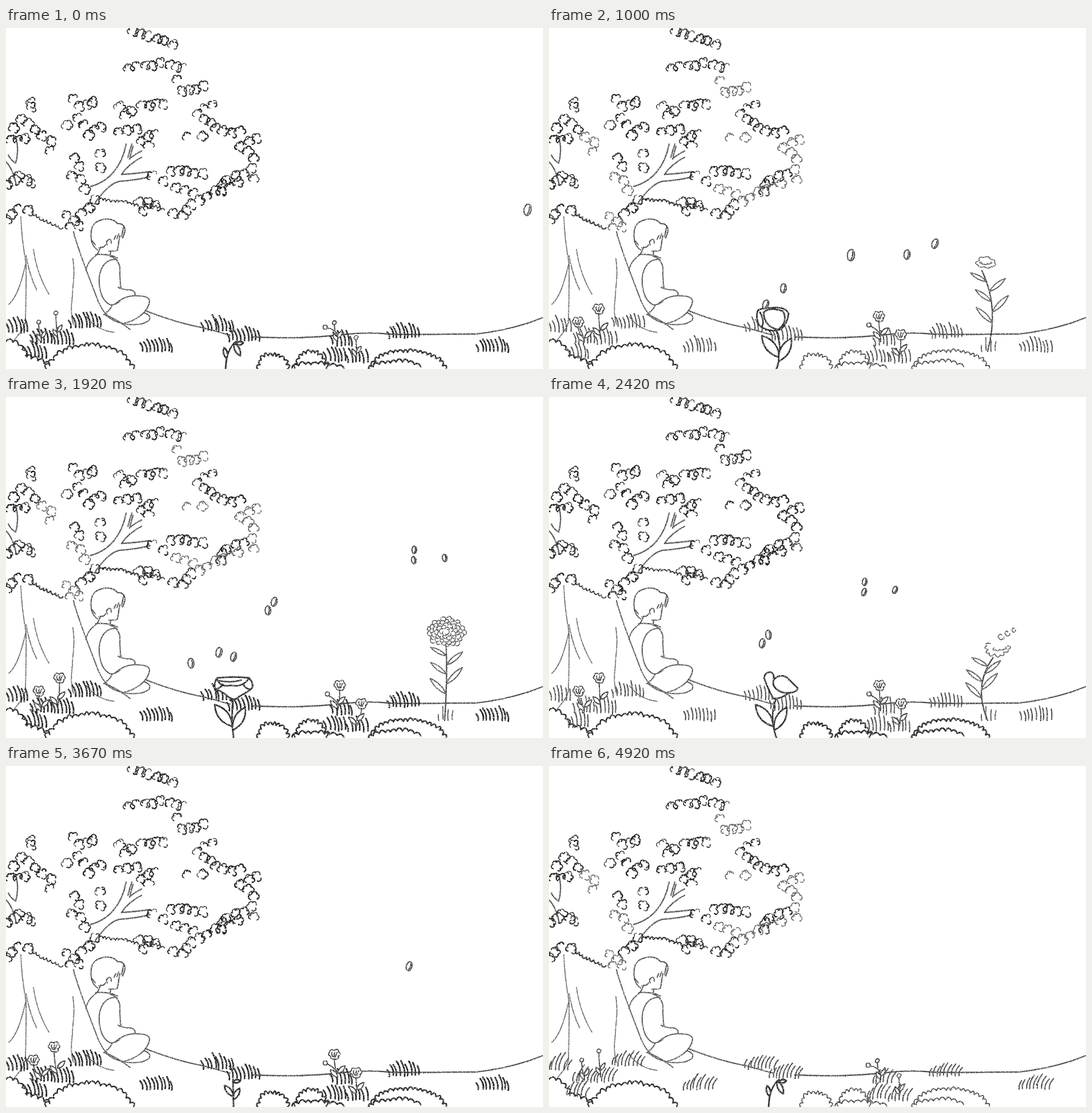
These frames come from a looping animation (939x596 px, 5000 ms). An HTML page with a canvas:

```html
<!DOCTYPE html>
<html lang="en">
<head>
<meta charset="utf-8">
<title>Under the tree</title>
<style>
  html, body { margin: 0; width: 939px; height: 596px; overflow: hidden; background: #fff; }
  canvas { display: block; filter: url(#pencil); }
  svg { position: absolute; width: 0; height: 0; }
</style>
</head>
<body>
<svg><filter id="pencil" x="0" y="0" width="100%" height="100%" color-interpolation-filters="sRGB">
  <feTurbulence type="fractalNoise" baseFrequency=".65" numOctaves="2" seed="4" result="noise"/>
  <feColorMatrix in="noise" values="0 0 0 0 0  0 0 0 0 0  0 0 0 0 0  4 0 0 0 -.9" result="grain"/>
  <feDisplacementMap in="SourceGraphic" in2="noise" scale="2" xChannelSelector="R" yChannelSelector="G" result="rough"/>
  <feComposite in="rough" in2="grain" operator="in"/>
</filter></svg>
<canvas id="stage" width="939" height="596"></canvas>
<script>
const ctx = document.getElementById('stage').getContext('2d');
const FPS = 12, LOOP = 5000;
const { sin, cos, exp, PI, min, max, hypot, floor, round, sqrt } = Math;
const TAU = 2 * PI;

function seeded(s) {
  return () => {
    s = (s + 0x6d2b79f5) | 0;
    let t = Math.imul(s ^ (s >>> 15), 1 | s);
    t = (t + Math.imul(t ^ (t >>> 7), 61 | t)) ^ t;
    return ((t ^ (t >>> 14)) >>> 0) / 4294967296;
  };
}

const points = s => s.split(' ').map(p => p.split(',').map(Number));
const mix = (a, b, u) => a + (b - a) * u;
const bend = (a, b, c, u) => mix(mix(a, b, u), mix(b, c, u), u);

// Smooth rise from 0 to 1 between two steps.
function ramp(k, from, to) {
  const u = max(0, min(1, (k - from) / (to - from)));
  return u * u * (3 - 2 * u);
}

function ink(color, width) {
  ctx.strokeStyle = color;
  ctx.lineWidth = width;
}

function line(d, color, width) {
  ink(color, width);
  ctx.stroke(new Path2D(d));
}

function curve(x0, y0, cx, cy, x1, y1) {
  ctx.beginPath();
  ctx.moveTo(x0, y0);
  ctx.quadraticCurveTo(cx, cy, x1, y1);
  ctx.stroke();
}

// ---- tree, sitter and ground ----
const TRUNK = 'M26 330C27 365 32 395 35 412C36 450 34 500 34 514C31 526 22 536 14 546' +
  'M35 410C28 440 20 470 5 483M35 398Q42 435 54 458M48 387Q54 430 75 465' +
  'M117 403C121 430 117 445 116 470C113 490 114 505 118 518M141 505Q158 528 189 532';
const BRANCHES = 'M148 277C182 268 203 240 210 203M154 308C168 288 182 272 198 268Q228 266 252 260' +
  'M237 226Q214 238 202 256Q230 254 252 251M220 203L213 226M237 215Q224 221 216 229L222 207' +
  'M4 190C9 186 16 188 18 194Q23 215 17 236Q9 232 4 222M0 234Q13 247 18 275';
const BACK = 'M118 356C126 388 143 430 156 464C163 484 170 498 180 504Q200 513 217 527';
const HEAD = 'M160 388Q149 379 149 368C147 350 152 340 165 336C178 331 190 335 195 342' +
  'C206 341 210 350 207 359Q205 364 204 367M206 346L202 365M197 360L194 368M192 363L189 369' +
  'M178 371Q184 366 184 376M178 371Q174 375 177 379M163 384Q172 384 174 379M151 372L156 379' +
  'M199 363Q197 376 195 388Q191 391 180 390M183 390L182 399M165 383Q163 391 159 396';
const BODY = 'M157 396Q180 394 195 402M158 397C147 405 141 415 140 424M195 405C178 402 165 415 163 437' +
  'C162 462 170 479 183 484Q192 484 199 478M182 399Q196 403 199 418Q199 440 201 455' +
  'M196 453Q204 458 219 458Q228 461 225 468M171 501Q181 495 186 484' +
  'M190 483Q207 467 228 468Q251 468 251 478Q249 492 235 503Q220 514 205 516Q190 515 173 501' +
  'M203 517Q238 522 250 511Q255 502 242 498';
const GROUND = 'M246 495C280 508 312 518 345 524Q368 530 392 537M430 540C500 543 540 541 590 536' +
  'Q628 531 672 535C730 537 770 534 820 535Q885 528 939 506';

function scenery() {
  line(GROUND, '#444', 2.3);
  line(TRUNK, '#666', 1.8);
  line(BRANCHES, '#555', 2.4);
  line(BACK, '#555', 2);
  line(HEAD, '#444', 2);
  line(BODY, '#555', 2.1);
}

// ---- foliage: puffs strung along a few sprays ----
const SPRAYS = ['222,5 291,29', '216,72 270,60 312,74', '302,92 306,112 344,104', '362,134 336,152 380,182 410,184',
  '320,190 342,192', '441,192 410,206 432,230 432,262', '416,258 384,264 378,288', '404,272 340,298 298,282',
  '290,248 344,253', '258,260 276,267', '294,322 310,332 326,308', '234,304 262,312 238,322'];
const INNER_SPRAYS = ['46,134 44,136', '14,174 26,160 50,178', '10,194 34,196', '62,190 80,196 76,218',
  '118,124 130,138 152,130', '108,172 124,158 144,186 166,176', '200,136 208,152 236,136 276,132', '194,184 226,176',
  '238,196 262,190 250,208', '122,226 126,242', '166,222 164,243', '112,260 132,262 136,284', '2,276 24,256 46,271',
  '0,336 18,320 38,322', '108,330 128,346 112,350', '134,326 156,302'];

// Visits evenly spaced spots on a polyline, passing position and unit direction.
function walk(pts, step, visit) {
  for (let i = 1; i < pts.length; i++) {
    const [ax, ay] = pts[i - 1], [bx, by] = pts[i];
    const len = hypot(bx - ax, by - ay), n = max(1, round(len / step));
    for (let j = 1; j <= n; j++)
      visit(mix(ax, bx, j / n), mix(ay, by, j / n), (bx - ax) / len, (by - ay) / len, len / n);
  }
}

function puff(x, y, rnd, faint) {
  for (let i = 0; i < 5; i++) {
    const a = PI * .9 + i * PI * .33 + rnd() * .5, r = 3.2 + rnd() * 1.4, d = 4 + rnd() * 3;
    const sweep = PI * (.35 + rnd() * .2), bold = rnd();
    if (i > 2 && bold < .4) continue;
    ink(faint ? '#555' : '#181818', faint ? 1.7 : 1.3 + bold * 1.3);
    ctx.beginPath();
    ctx.arc(x + cos(a) * d, y + sin(a) * d, r, a - sweep, a + sweep);
    ctx.stroke();
  }
}

function scallop(pts, step, seed, color, width) {
  const rnd = seeded(seed);
  let [px, py] = pts[0];
  ink(color, width);
  ctx.beginPath();
  ctx.moveTo(px, py);
  walk(pts, step, (x, y, ux, uy, gap) => {
    const h = step * (.7 + rnd() * .5);
    const ex = x + (rnd() - .5) * 3, ey = y + (rnd() - .5) * 3;
    ctx.quadraticCurveTo((px + x) / 2 + uy * h, (py + y) / 2 - ux * h, ex, ey);
    [px, py] = [ex, ey];
  });
  ctx.stroke();
}

function foliage(k) {
  const alt = floor(k / 3) % 3 === 1, rnd = seeded(11);
  for (const spray of [...SPRAYS, ...INNER_SPRAYS]) {
    const moved = rnd() < .35 && alt, pts = points(spray);
    const place = (x, y) => puff(x + rnd() * 5 - 2.5, y + rnd() * 6 - 3 + moved * 2, rnd, moved);
    place(...pts[0]);
    walk(pts, 15, place);
  }
  scallop(points('100,349 72,337 46,322'), 8, 3, '#333', alt ? 2.6 : 2);
  scallop(points('162,301 205,305 232,313'), 7, alt ? 8 : 5, '#222', alt ? 2.6 : 2);
  scallop(points('252,312 277,319'), 7, 8, '#333', 2);
}

// ---- bushes ----
function mound(x0, x1, base, h, color, width) {
  const arch = Array.from({ length: 9 }, (_, i) =>
    [mix(x0, x1, i / 8), base - h * sqrt(sin(PI * i / 8))]);
  scallop(arch, 10, x0, color, width);
}

function bushes(k) {
  const dark = floor(k / 5) % 4 < 2, color = dark ? '#222' : '#444', width = dark ? 2.7 : 2;
  scallop(points('0,547 22,554 36,574 76,590'), 10, 40, '#222', 2.5);
  mound(70, 222, 596, 40, '#222', 2.5);
  mound(440, 492, 596, 24, color, width);
  mound(505, 560, 594, 26, color, width);
  mound(500, 590, 594, 6, color, width);
  mound(635, 770, 596, 30, color, width);
  mound(642, 724, 592, 8, color, width);
}

// ---- grass: four poses of five steps each ----
const TUFTS = points('369,531 413,548 693,543 850,567 262,567 137,525');
const CLUMPS = points('18,533 60,553 98,554 50,578 574,584 612,586 585,556');
const LEAN = [-.25, -.1, -.2, .35];

function tuft(x, base, w, h, lean, rnd) {
  const n = round(w / 6);
  for (let i = 0; i < n; i++) {
    const u = i / (n - 1), tall = h * (.35 + .65 * sin(PI * (.1 + .72 * u))) * (.8 + rnd() * .35);
    const foot = x + (u - .5) * w - lean * tall * .5 + rnd() * 2, y = base - rnd() * 4;
    curve(foot, y, foot + (lean < 0 ? 1.5 : -1), y - tall * .5, foot + tall * (lean + (u - .5) * .15), y - tall);
  }
}

function grass(k) {
  const g = floor(k / 5) % 4, rnd = seeded(70 + g);
  ink(g ? '#444' : '#222', g ? 2.2 : 2.9);
  for (const [x, y] of TUFTS) tuft(x, y, 52, 24, LEAN[g], rnd);
  for (const [x, y] of CLUMPS) tuft(x, y, 33, 27, LEAN[g], rnd);
}

// ---- flowers ----
const gust = k => 10 * exp(-(((k - 21) / 8) ** 2));

function leaf(bx, by, tx, ty, fat = .28) {
  const mx = (bx + tx) / 2, my = (by + ty) / 2, nx = (ty - by) * fat, ny = (bx - tx) * fat;
  ctx.beginPath();
  ctx.moveTo(bx, by);
  ctx.quadraticCurveTo(mx + nx, my + ny, tx, ty);
  ctx.quadraticCurveTo(mx - nx, my - ny, bx, by);
  ctx.fill();
  ctx.stroke();
}

function ruffle(x, y, rx, ry, n, from = 0, to = TAU) {
  const at = (a, s) => [x + cos(a) * rx * s, y + sin(a) * ry * s];
  ctx.beginPath();
  ctx.moveTo(...at(from, 1));
  for (let i = 0; i < n; i++) {
    const a = mix(from, to, (i + .5) / n), b = mix(from, to, (i + 1) / n);
    ctx.quadraticCurveTo(...at(a, 1.5 + .15 * sin(i * 5)), ...at(b, .92 + .1 * cos(i * 3)));
  }
  ctx.fill();
  ctx.stroke();
}

function blossom(x, y, footX, footY, open) {
  const r = 3.5 + 5.5 * open, s = 8 + 5 * open;
  curve(x, y + r, x + 1, (y + footY) / 2, footX, footY);
  for (const side of [-1, 1]) {
    const my = mix(y, footY, .6 - side * .08);
    leaf(footX, my + 10, footX + side * s, my - 3, .38);
  }
  ruffle(x, y, r, r * .9, open < .35 ? 4 : 6, .5, TAU + .5);
  if (open < .35) return;
  for (const dx of [-4, 1, 5]) curve(x + dx, y - r * .4, x + dx - 2, y, x + dx * .4, y + r * .5);
}

function smallFlowers(k) {
  const open = min(ramp(k, 0, 8), 1 - ramp(k, 53, 59)), s = gust(k), bud = 1 - open;
  ink('#3a3a3a', 1.9);
  blossom(48 + s + 9 * bud, 514, 62, 549, open);
  blossom(84 + s + 3 * bud, 491 + 7 * bud, 90, 544, open);
  blossom(574 + s, 504 + 11 * bud, 580, 548, open);
  blossom(612 + s, 536 + 5 * bud, 613, 575, open);
  curve(562, 521 + 4 * bud, 570, 524, 579, 534);
  ruffle(558 + s * .4, 519 + 4 * bud, 4, 3.5, 4);
}

const ROSE_BUD = new Path2D('M-32-34Q-26-39-6-39Q16-41 22-29Q20-11 8-1Q-16 5-30-9Q-36-24-32-34' +
  'M-22-31Q-10-41 12-33Q22-15 4-1Q-20-5-22-31M-28-31Q-20-17-24-7');
const ROSE_OPEN = new Path2D('M-28-37Q3-40 28-37Q39-24 31-17Q22-10 10-4Q3 4-7-3Q-18-14-31-17Q-34-28-28-37' +
  'M-28-35Q-22-20-4-24Q16-20 28-36M-24-32Q-4-28 14-33M-31-17Q-20-20-18-26M31-17Q20-18 18-27');
const TULIP = new Path2D('M-5-1Q-15-20-21-37Q-19-48-9-47Q-3-45-4-34Q8-46 20-37L38-19Q36-11 22-11Q10 0-5-1' +
  'M-4-34Q-8-23 4-15Q12-10 22-11');

function rose(k) {
  const size = ramp(k, 2, 11) - ramp(k, 29, 37);
  const young = 1 - ramp(k, 0, 6) + ramp(k, 53, 59);
  const footX = 398 - 14 * young, topX = 397 + 5 * young, topY = mix(548, 528, size);
  const midX = 397 - 12 * young + 13 * size * cos((k - 12) * .17);
  const at = u => [bend(footX, midX, topX, u), bend(596, 562, topY, u)];
  const reach = .5 + .5 * size;

  ink('#2a2a2a', 2.8);
  curve(footX, 596, midX, 562, topX, topY);
  const [lx, ly] = at(.3), [rx, ry] = at(.2 + .7 * young);
  leaf(lx, ly, lx - 31 * reach * (1 - .7 * young), ly - 38 * reach, .35);
  leaf(rx, ry, rx + 22 * reach, ry + mix(-40 * reach, 22, young), .35);
  if (size < .25) return leaf(topX, topY + 4, topX + 13, topY + 2, .45);
  const head = k < 15 ? ROSE_BUD : k < 24 ? ROSE_OPEN : TULIP;
  ctx.save();
  ctx.translate(topX, topY);
  ctx.scale(size, size);
  ctx.fill(head);
  ctx.stroke(head);
  ctx.restore();
}

function shaggy(x, y, rx, ry) {
  const rnd = seeded(31);
  ctx.beginPath();
  ctx.ellipse(x, y, rx, ry, 0, 0, TAU);
  ctx.fill();
  for (let i = 0; i < 60; i++) {
    const a = i * 2.4, d = sqrt(i / 60), r = 3 + rnd() * 2;
    ctx.beginPath();
    ctx.arc(x + cos(a) * rx * d, y + sin(a) * ry * d, r, a - 1.4, a + 1.2 + rnd());
    ctx.stroke();
  }
}

function tallHead(x, y, s, k) {
  ink('#555', 1.7);
  if (k < 15) {
    ruffle(x + 7, y - 14, 15 * s, 9 * s, 7);
    ruffle(x + 7, y - 15, 9 * s, 4 * s, 5, 0, PI);
  } else if (k < 24) {
    shaggy(x + 1, y - 24, 32 * s, 24 * s);
  } else {
    ruffle(x + 7, y - 17, 19 * s, 13 * s, 8, -.3, PI * 1.25);
    ruffle(x + 10, y - 20, 12 * s, 7 * s, 4, .2, 2.6);
    for (const i of [1, 2, 3]) ruffle(x + 3 + 11 * i, y - 30 - 6 * i, 6 - i, 5 - i * .5, 4, 0, 5);
  }
}

function tallFlower(k) {
  if (k < 3 || k > 43) return;
  const size = ramp(k, 2, 10) - ramp(k, 29, 36);
  const grow = ramp(k, 2, 10) - ramp(k, 30, 44);
  const x = 767 + (1.15 * (k - 12) - 10) * grow, y = 565 - (141 - 3.5 * max(0, k - 20)) * grow;
  const cx = 767 + 30 * grow * cos((k - 16) * .2), cy = mix(565, y, .55);

  ink('#3a3a3a', 2.3);
  curve(767, 565, cx, cy, x, y);
  ink('#555', 2);
  tuft(767, 566, 24, 22, 0, seeded(9));
  for (let i = 0; i < 5; i++) {
    if (k < 33) {
      const u = .85 - .13 * i, side = i % 2 ? 1 : -1;
      const bx = bend(767, cx, x, u), by = bend(565, cy, y, u);
      leaf(bx, by, bx + side * 28 * grow, by - (15 + 5 * (i % 2) + 3 * i) * grow, .2);
    } else {
      const px = 772 + 18 * sin(1 + i * 1.2) - 2 * (k - 38), py = 432 + 16 * i + 7 * (k - 38);
      const tilt = 3 * sin(i * 1.3 + k * .2);
      leaf(px - tilt, py + 7, px + tilt, py - 7, .35);
    }
  }
  if (size > .2) tallHead(x, y, size, k);
}

// ---- drifting petals: each flight passes its spots at step `at` ----
const FLIGHTS = [
  { from: 0, to: 22, at: 12, vx: -32, vy: 6.6, size: 10, spots: '528,397' },
  { from: 1, to: 23, at: 12, vx: -27.5, vy: 6.3, size: 8.5, spots: '626,396 675,377' },
  { from: 9, to: 15, at: 12, vx: -11, vy: 4, size: 8, spots: '410,455 379,483' },
  { from: 13, to: 33, at: 18, vx: -14.2, vy: 9.6, size: 8, spots: '540,310 529,325' },
  { from: 13, to: 26, at: 18, vx: -30, vy: 5, size: 8, spots: '548,429' },
  { from: 22, to: 42, at: 29, vx: -27, vy: 9.3, size: 6.5, spots: '552,323 551,341 605,337' },
  { from: 39, to: 47, at: 39, vx: -45, vy: 8, size: 8, spots: '930,310' }];

function petal(x, y, r, tilt) {
  ctx.save();
  ctx.translate(x, y);
  ctx.rotate(tilt);
  ctx.beginPath();
  ctx.ellipse(0, 0, r * .62, r, 0, 0, TAU);
  ctx.fill();
  ctx.stroke();
  curve(r * .2, -r * .6, r * .45, 0, r * .1, r * .7);
  ctx.restore();
}

function petals(k) {
  ink('#444', 2.2);
  for (const f of FLIGHTS) {
    if (k < f.from || k > f.to) continue;
    const d = k - f.at;
    points(f.spots).forEach(([x, y], i) =>
      petal(x + f.vx * d, y + f.vy * d, f.size, .1 + .3 * sin(d * .5 + i)));
  }
}

function draw(k) {
  ctx.clearRect(0, 0, 939, 596);
  ctx.fillStyle = '#fff';
  ctx.lineCap = ctx.lineJoin = 'round';
  scenery();
  foliage(k);
  bushes(k);
  grass(k);
  smallFlowers(k);
  tallFlower(k);
  rose(k);
  petals(k);
}

let shown = -1;
function tick() {
  // steps fall on times cut to hundredths of a second
  const k = floor((performance.now() % LOOP + 4) * FPS / 1000) % 60;
  if (k !== shown) draw(shown = k);
  requestAnimationFrame(tick);
}
tick();
</script>
</body>
</html>
```
